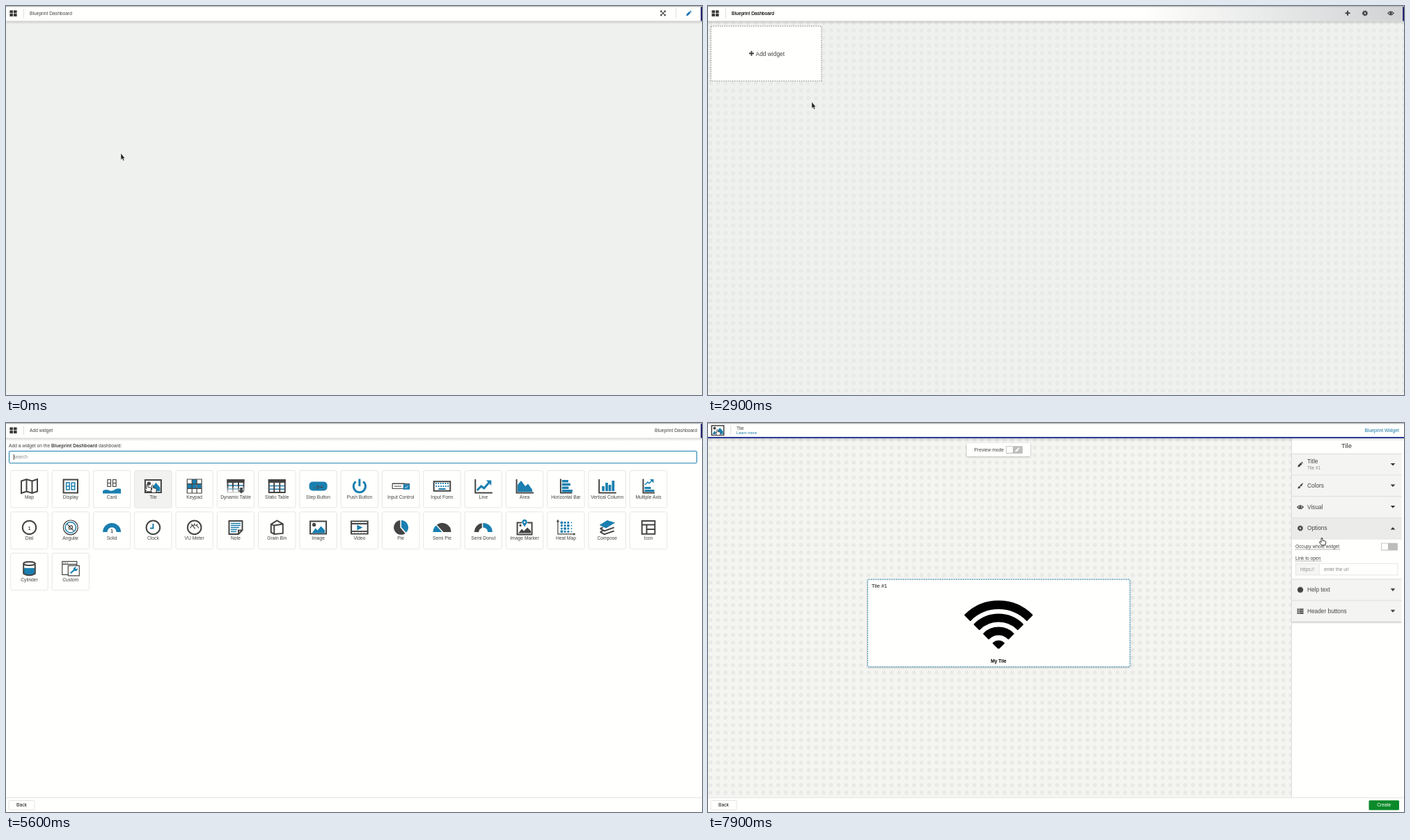
These frames come from a looping animation (1000 px wide and 560 px high, 8000 ms). An HTML page:

```html
<!DOCTYPE html>
<html lang="en">
<head>
<meta charset="utf-8">
<title>Dashboard builder</title>
<style>
html, body { margin: 0; width: 100%; height: 100%; overflow: hidden; background: #eff1ef; }
svg { display: block; width: 100vw; height: 100vh; }
text { font-family: "Liberation Sans", Arial, sans-serif; font-size: 6.7px; fill: #444; white-space: pre; }
.mid { text-anchor: middle; }
.end { text-anchor: end; }
.bold { font-weight: bold; }
.s, .n, .c { fill: none; stroke: #444; stroke-width: 2; }
.n { stroke-width: 1.2; }
.c { stroke: #1a7fb0; stroke-width: 1.5; }
.d { fill: #444; }
.b { fill: #1a7fb0; }
.w { fill: #fffffd; }
.i { fill: currentColor; }
.l { fill: none; stroke: currentColor; stroke-width: 1.2; }
.teeth { fill: none; stroke: currentColor; stroke-width: 1.4; stroke-dasharray: 1.5 1.17; }
.body { fill: none; stroke: currentColor; stroke-width: 1.9; }
.hand { fill: #fffffd; stroke: #222; stroke-width: .9; stroke-linejoin: round; }

.anim { animation: 8s step-end infinite both; }
.dash { animation-name: dash; }
.pick { animation-name: pick; }
.edit { animation-name: edit; }
.fade { animation-name: fade; animation-timing-function: linear; }
.add { animation-name: add; }
.over { animation-name: over; }
.leave { animation-name: leave; animation-timing-function: linear; }
.enter { animation-name: enter; animation-timing-function: linear; }
.status { animation-name: status; }
.caret { animation-name: caret; }
.tilehover { animation-name: tilehover; }
.card { animation: card 8s linear infinite both; animation-delay: calc(var(--i) * 20ms); }
.open { animation-name: open; }
.shut { animation-name: shut; }
.drop { animation-name: drop; }
.cursor { animation-name: cursor; }
.arrow { animation-name: arrow; }
.point { animation-name: point; }

@keyframes dash { 0% { opacity: 1 } 45%, 100% { opacity: 0 } }
@keyframes pick { 0% { opacity: 0 } 45% { opacity: 1 } 73.75%, 100% { opacity: 0 } }
@keyframes edit { 0% { opacity: 0 } 73.75%, 100% { opacity: 1 } }
@keyframes fade { 0%, 23.75% { opacity: 0 } 31.25%, 100% { opacity: 1 } }
@keyframes add { 0% { opacity: 0 } 23.75%, 100% { opacity: 1 } }
@keyframes over { 0% { opacity: 0 } 40%, 100% { opacity: 1 } }
@keyframes leave {
  0%, 23.75% { opacity: 1; transform: none }
  26.25% { opacity: .75; transform: translate(-9.4px, 0) }
  28.75%, 100% { opacity: 0; transform: translate(-20px, 0) }
}
@keyframes enter {
  0%, 28.75% { opacity: 0; transform: translate(10px, 0) }
  31.25%, 100% { opacity: 1; transform: none }
}
@keyframes status { 0% { opacity: 0 } 21.25% { opacity: 1 } 30% { opacity: 0 } 42.5%, 100% { opacity: 1 } }
@keyframes caret { 0% { opacity: 1 } 57.5% { opacity: 0 } 63.75%, 100% { opacity: 1 } }
@keyframes tilehover { 0% { opacity: 0 } 66.25%, 100% { opacity: 1 } }
@keyframes card { 0%, 46.75% { opacity: 0 } 50.25%, 100% { opacity: 1 } }
@keyframes open { 0% { opacity: 0 } 98.75%, 100% { opacity: 1 } }
@keyframes shut { 0% { opacity: 1 } 98.75%, 100% { opacity: 0 } }
@keyframes drop { 0% { transform: none } 98.75%, 100% { transform: translate(0, 57.7px) } }
@keyframes arrow {
  0% { opacity: 1 } 21.25% { opacity: 0 } 23.75% { opacity: 1 } 40% { opacity: 0 }
  45% { opacity: 1 } 66.25% { opacity: 0 } 73.75% { opacity: 1 } 92.5%, 100% { opacity: 0 }
}
@keyframes point {
  0% { opacity: 0 } 21.25% { opacity: 1 } 23.75% { opacity: 0 } 40% { opacity: 1 }
  45% { opacity: 0 } 66.25% { opacity: 1 } 73.75% { opacity: 0 } 92.5%, 100% { opacity: 1 }
}
@keyframes cursor {
  0% { transform: translate(165px, 212px) }
  7.5% { transform: translate(165px, 212px); animation-timing-function: steps(2, start) }
  10% { transform: translate(480px, 228px); animation-timing-function: steps(2, start) }
  12.5% { transform: translate(894px, 149px) }
  13.75% { transform: translate(894px, 149px); animation-timing-function: steps(5, start) }
  20% { transform: translate(987px, 20px) }
  21.25% { transform: translate(984px, 13px) }
  27.5% { transform: translate(984px, 13px); animation-timing-function: steps(4, start) }
  32.5% { transform: translate(675px, 238px); animation-timing-function: steps(4, start) }
  37.5% { transform: translate(149px, 138px) }
  38.75% { transform: translate(149px, 138px); animation-timing-function: steps(2, start) }
  41.25% { transform: translate(123px, 98px) }
  46.25% { transform: translate(123px, 98px); animation-timing-function: steps(5, start) }
  52.5% { transform: translate(174px, 330px) }
  63.75% { transform: translate(174px, 330px); animation-timing-function: steps(3, start) }
  67.5% { transform: translate(206px, 88px) }
  68.75% { transform: translate(206px, 88px); animation-timing-function: steps(2, start) }
  71.25% { transform: translate(203px, 88px) }
  73.75% { transform: translate(202px, 90px) }
  76.25% { transform: translate(202px, 90px); animation-timing-function: steps(4, start) }
  81.25% { transform: translate(251px, 214px) }
  83.75% { transform: translate(251px, 214px); animation-timing-function: steps(9, start) }
  95% { transform: translate(883px, 150px); animation-timing-function: steps(2, start) }
  97.5%, 100% { transform: translate(882px, 165px) }
}
</style>
</head>
<body>
<svg id="stage" viewBox="0 0 1000 560" preserveAspectRatio="none">
  <defs>
    <pattern id="dots" x="-1.9" y="19.1" width="10.83" height="10.8" patternUnits="userSpaceOnUse">
      <rect x="3.5" y="3.5" width="4" height="4" rx="1" fill="#e9ebe9" stroke="#e0e2e0" stroke-width=".9"/>
    </pattern>
    <linearGradient id="tint">
      <stop offset=".62" stop-color="#d0d2d4" stop-opacity="0"/>
      <stop offset="1" stop-color="#d0d2d4"/>
    </linearGradient>
    <linearGradient id="shade" x2="0" y2="1">
      <stop stop-color="#000" stop-opacity=".18"/>
      <stop offset="1" stop-color="#000" stop-opacity="0"/>
    </linearGradient>
    <linearGradient id="pale" x2="0" y2="1">
      <stop offset=".3" stop-color="#fffffd" stop-opacity="0"/>
      <stop offset="1" stop-color="#fffffd"/>
    </linearGradient>
    <filter id="soft" x="-10%" y="-20%" width="120%" height="150%">
      <feDropShadow dx="0" dy="1" stdDeviation="1.5" flood-opacity=".25"/>
    </filter>
  </defs>
</svg>
<script>
const WHITE = '#fffffd', BLUE = '#1a7fb0';

const rect = (x, y, w, h, fill, more = '') =>
  `<rect x="${x}" y="${y}" width="${w}" height="${h}" fill="${fill}" ${more}/>`;
const text = (x, y, str, cls = '', size = 6.7, fill = '#444') =>
  `<text x="${x}" y="${y}" class="${cls}" style="font-size:${size}px;fill:${fill}">${str}</text>`;
const group = (cls, ...parts) => `<g class="${cls}">${parts.join('')}</g>`;
const ring = (r, x = 0, y = 0) =>
  `M${x - r} ${y}a${r} ${r} 0 1 1 ${2 * r} 0a${r} ${r} 0 1 1 ${-2 * r} 0z`;
const box = (x, y, w, h) => `M${x} ${y}h${w}v${h}h${-w}z`;
const boxes = list => list.map(b => box(...b)).join('');

// "class:path;class:path", or raw markup
const draw = spec => spec.split(';').map(part => {
  if (part[0] === '<') return part;
  const [cls, d] = part.split(':');
  return `<path class="${cls}" d="${d}"/>`;
}).join('');
const icon = (x, y, spec, color = '#444', k = 1) =>
  `<g transform="translate(${x} ${y}) scale(${k})" color="${color}">${draw(spec)}</g>`;
const label = (x, y, str, size, color) =>
  `<text class="mid bold" x="${x}" y="${y}" style="font-size:${size}px;fill:${color}">${str}</text>`;

const glyph = {
  blocks: `i:${boxes([[-5, -4.3, 4.6, 3.9], [.6, -4.3, 4.6, 3.9], [-5, .4, 4.6, 3.9], [.6, .4, 4.6, 3.9]])}`,
  expand: 'l:M-3-3L3 3M3-3L-3 3;i:M-3.8-3.8h3L-3.8-.8zM3.8-3.8h-3L3.8-.8zM-3.8 3.8h3L-3.8.8zM3.8 3.8h-3L3.8.8z',
  pencil: 'i:M-3.7 3.7L-3.2 1.2 .7-2.7 2.7-.7-1.2 3.2zM1.2-3.2L2.2-4 4 -2.2 3.2-1.2z',
  plus: 'i:M-1-3.5h2v2.5h2.5v2H1v2.5h-2V1h-2.5v-2H-1z',
  gear: `teeth:${ring(3.4)};body:${ring(2.2)}`,
  eye: `l:M-4.2 0Q0-5 4.2 0Q0 5-4.2 0z;i:${ring(1.8)}`,
  brush: 'i:M4.3-4.3Q3 0 .6 1.5L-.9 0Q.8-2.6 4.3-4.3zM-1.5.5L.2 2.1Q-.5 4.8-4.2 3.8Q-3 3-2.8 1.6Q-2.4.5-1.5.5z',
  help: `i:${ring(4.2)};` + label(0, 2.4, '?', 7, WHITE),
  list: `i:${[-3.6, -.9, 1.8].map(y => box(-4.5, y, 2.3, 2.1) + box(-1.6, y, 6.2, 2.1)).join('')}`
};

const digits = (y, h) => [-6.2, 1.4].map(x => box(x, y, 4.6, h) + `M${x} ${y + h / 2}h4.6`).join('');
const axes = 's:M-11.5-10V9.5H13';
const hills = 'b:M-9 8L-4 1-1 4 4-2 9.5 4V8z';
const frame = `s:${box(-11.5, -9, 23, 18)}`;
const keys = [-4, 0, 4].map((y, r) => r === 2
  ? box(-5, y - .9, 10, 1.8)
  : Array.from({ length: 6 }, (_, i) => box(-9.5 + i * 3.4 + r * .4, y - .9, 1.8, 1.8)).join('')).join('');
const heat = Array.from({ length: 16 }, (_, i) =>
  ring(i % 4 === 3 ? .9 : i % 3 ? 1.6 : 2, -6 + i % 4 * 4.7, -7 + (i >> 2) * 4.3)).join('');
const table = `d:${box(-12.5, -10, 25, 5)};s:${box(-11.5, -9, 23, 18)}`;

const widgets = [
  ['Map', 's:M-11.5-7.5L-4-10 4-7.5 11.5-10V7.5L4 10-4 7.5-11.5 10zM-4-10V7.5M4-7.5V10'],
  ['Display', `s:${box(-10.2, -9.5, 20.4, 19)};c:${digits(-5, 10)}`],
  ['Card', `n:${digits(-9.5, 10)};b:M-13 6.5Q-8 4-4 6T4 5T13 4V10.5H-13z`],
  ['Tile', `${frame};d:${ring(2.6, -6, -4)};b:M-10 7L-6 1-3 4 4-5 10 2V7z;` +
    'hand:M-1.8-1Q-.8-2.6.2-1V2.4L4 3.3Q5 3.7 4.8 5L4 9.5H-.8L-4.6 5Q-4.4 3.6-3 4L-1.8 5z'],
  ['Keypad', `b:${boxes([[-3.5, -10, 7, 6], [-10, -3, 7, 6], [-3, -3, 6, 6], [4, -3, 6, 6]])};n:${box(-10.4, -10, 20.8, 20)}M-3.4-10V10M3.4-10V10M-10.4-3.4H10.4M-10.4 3.4H10.4`],
  ['Dynamic Table', `${table};c:M-11-1H11M-11 4H11;s:M-4-6V9M4-6V9;<rect x="-13" y="-5" width="26" height="16" fill="url(#pale)"/>;d:M6.3 2h3.4v4h2.6L8 10.5 3.7 6h2.6z`],
  ['Static Table', `${table};c:M-11-.6H11M-11 4.2H11;s:M-4-6V9M4-6V9`],
  ['Step Button', '<rect class="b" x="-13" y="-6.5" width="26" height="13" rx="5"/>;' + label(0, 3.6, '- 5º+', 10, WHITE)],
  ['Push Button', '<path class="c" style="stroke-width:3" d="M-5.3-6.6A8.6 8.6 0 1 0 5.3-6.6M0-10.5V0"/>'],
  ['Input Control', `n:${box(-12, -3.5, 24, 7)}M-9.5 0H1M-12.5-3.8H6;b:${box(3.5, -2.8, 9.5, 7.6)};<path d="M6 1L7.6 2.6 10.6-.6" fill="none" stroke="${WHITE}"/>`],
  ['Input Form', `s:${box(-11.8, -6.8, 23.6, 13.6)};b:${keys}`],
  ['Line', `${axes};<path class="c" style="stroke-width:3" d="M-9 6L-3 0 1 3 8-5"/>;b:M4-8.5H11.5V-1z`],
  ['Area', `${axes};b:M-10 8V-2L-5-8 1 0 5-3.5 11 5V8z`],
  ['Horizontal Bar', `s:M-7.5-10.5V9.5H9;b:${boxes([[-5.5, -9, 9, 3.5], [-5.5, -4.3, 12, 3.5], [-5.5, .4, 9.5, 3.5], [-5.5, 5, 15, 3.5]])}`],
  ['Vertical Column', `${axes};b:${boxes([[-7.5, 0, 3.7, 7], [-2.5, -5, 3.7, 12], [2, -2, 3.7, 9], [6.8, -8, 3.7, 15]])}`],
  ['Multiple Axis', `s:M-7.5-10.5V9.5H9;b:${boxes([[-5.5, 1, 9, 3], [-5.5, 5, 14, 3]])}M2-10H7.5V-4.5z;c:M-5-2L-1-6 1-4 5-8`],
  ['Dial', `s:${ring(9.7)};` + label(0, 3.8, '1', 10.5, BLUE)],
  ['Angular', `n:${ring(10.4)};c:${ring(7.6)};n:M-5-5L4.5 5M-2 2.5Q-4-3 2-2.5Q5 3-2 2.5z`],
  ['Solid', 'b:M-13 6.5A13 13 0 0 1 13 6.5H6.6A6.6 6.6 0 0 0-6.6 6.5z;' + label(0, 7.2, '1', 8, '#444')],
  ['Clock', `s:${ring(9.8)};<path class="c" style="stroke-width:2" d="M0-5.5V1H-4.5"/>`],
  ['VU Meter', `s:${ring(9.8)};n:M-6 1A6.3 6.3 0 0 1 6 1M-3-3.5L1 2M-4.5-5L-3-3M4.5-5L3-3M0-6V-4`],
  ['Note', 's:M-9.5-9.5H9.5V4L4 9.5H-9.5zM9.5 4H4V9.5;c:M-7-6H7M-7-3H7M-7 0H5M-7 3H2M-7 6H1'],
  ['Grain Bin', 's:M-8.5-4.5L0-10 8.5-5V8.5L-4 9.5-8.5 7zM-8.5-4.5L-4-3V9.5M-4-3L8.5-5'],
  ['Image', `${frame};d:${ring(2.6, -6, -4)};${hills}`],
  ['Video', `s:${box(-11.8, -9, 23.6, 18)}M-11-5.5H11M-11 5.5H11;w:${[-9, -4.5, 0, 4.5, 9].map(x => box(x - 1, -8, 2, 1.6) + box(x - 1, 6.4, 2, 1.6)).join('')};b:M-3.5-4V4L4.5 0z`],
  ['Pie', 'd:M-.8-10.5A10.5 10.5 0 1 0 6.5 8.5L-.8 0z;b:M.8-10.5A10.5 10.5 0 0 1 7.8 7.3L.8-.5z'],
  ['Semi Pie', 'b:M-13 6.5A13 13 0 0 1-8.5-3L0 6.5z;d:M-7.6-4A13 13 0 0 1 13 6.5H2z'],
  ['Semi Donut', 'd:M-13 6.5A13 13 0 0 1-2-6.3V.5A6.5 6.5 0 0 0-6.5 6.5z;b:M-.5-6.5A13 13 0 0 1 13 6.5H6.5A6.5 6.5 0 0 0-.5.2z'],
  ['Image Marker', `s:M-4-7H-10.5V10H10.5V-7H4;d:M-9 8L-4 2-1 5 4 0 9 5V8z${ring(1.7, -6, -3)};b:M0-1L-3.6-7A3.7 3.7 0 1 1 3.6-7z;w:${ring(1.3, 0, -7.6)}`],
  ['Heat Map', `n:M-11.5-10V9.5H13M-13-8L-11.5-10.5-10-8M11-11;d:M11 7.5L14 9.5 11 11.5z;b:${heat}`],
  ['Compose', 's:M-10 6.5L-4 9.8 10 5M-10 1.5L-4 5 10 0M-10 6.5L-6 4.5M-10 1.5L-6 0;b:M-11-3.5L0-10.5 11.5-7-1.5 1z'],
  ['Icon', `s:${box(-9.3, -9.3, 18.6, 18.6)}M-9-4H9M-2.5-4V9M-2.5 2.5H9`],
  ['Cylinder', 'b:M-7.5-1H7.5V7.5Q0 11-7.5 7.5z;s:M-8.3-7.5V7Q0 12 8.3 7V-7.5A8.3 2.6 0 1 0-8.3-7.5A8.3 2.6 0 0 0 8.3-7.5'],
  ['Custom', `n:${box(-12, -10.5, 21, 19)}M-12-6.5H9M-10-8.5h1M-7.5-8.5h1M-5-8.5h1;w:${box(-3.5, -4.5, 16, 15)};n:${box(-3.5, -4.5, 16, 14.5)};<path class="c" style="stroke-width:2.2" d="M0 6.5L6 1"/>;b:M4 1Q4-3 8.5-2.5L6.8-.5 8 .8 10-1Q10.5 4 6 3.3z`]
];

const header = (...parts) =>
  rect(0, 21, 1000, 5, 'url(#shade)') + rect(0, 0, 1000, 21.5, WHITE) +
  parts.join('') + rect(0, 0, 1000, 1.3, '#b9bab8');
const rule = (x, y = 3.5, h = 14) => rect(x, y, .8, h, '#d8d9d7');
const menu = title => icon(10.4, 10.6, glyph.blocks, '#3a3a3a') + rule(25) + text(34, 13.2, title);
const edge = rect(998.2, 0, 1.8, 21.5, '#17176b');
const footer = rect(0, 539.5, 1000, 20.5, WHITE) + rect(0, 539, 1000, .8, '#dfe0de') +
  rect(4, 543.5, 37, 13.5, WHITE, 'rx="1.5" stroke="#dcdddb" stroke-width=".8"') +
  text(22.5, 552.3, 'Back', 'mid', 6.7, '#111');

const dashboard = group('anim dash',
  rect(0, 0, 1000, 560, '#eff1ef'),
  group('anim fade', rect(0, 22, 1000, 538, 'url(#dots)')),
  header(
    group('anim fade', rect(0, 0, 1000, 21.5, 'url(#tint)')),
    menu('Blueprint Dashboard'),
    group('anim add', text(34, 13.2, 'Blueprint Dashboard', '', 6.7, '#222')),
    group('anim leave', icon(944, 10.4, glyph.expand), rule(962.3), icon(981, 10.6, glyph.pencil, '#1a73b5')),
    group('anim enter', icon(919, 10.3, glyph.plus), icon(944, 10.4, glyph.gear), rule(962.3), icon(981, 10.4, glyph.eye)),
    edge),
  group('anim add',
    rect(4.2, 29, 159, 79, WHITE),
    group('anim over', rect(4.2, 29, 159, 79, '#e3e5e3')),
    rect(4.2, 29, 159, 79, 'none', 'stroke="#a9aaa9" stroke-width="1.6" stroke-dasharray="1.6 1.6"'),
    icon(62.5, 68.2, glyph.plus),
    text(68.6, 71.6, 'Add widget', '', 8.4)),
  group('anim status', `<path d="M0 547H231Q233 547 233 549V560H0z" fill="#dadddf" stroke="#cfd2d3" stroke-width=".6"/>`));

const cards = widgets.map(([name, spec], i) => {
  const x = 33.5 + i % 16 * 59.3, y = 95.2 + Math.floor(i / 16) * 59.4;
  const hover = name === 'Tile' ? group('anim tilehover', rect(x - 26.7, y - 26.7, 53.4, 53.4, '#f2f3f1', 'rx="2"')) : '';
  return `<g class="card" style="--i:${i}">` + hover +
    rect(x - 26.7, y - 26.7, 53.4, 53.4, 'none', 'rx="2" stroke="#e4e5e3" stroke-width=".9"') +
    icon(x, y - 4.2, spec) + text(x, y + 13.8, name, 'mid') + '</g>';
}).join('');

const picker = group('anim pick',
  rect(0, 0, 1000, 560, WHITE),
  header(menu('Add widget'), text(993, 13.2, 'Blueprint Dashboard', 'end'), edge),
  text(4, 35.4, 'Add a widget on the <tspan class="bold">Blueprint Dashboard</tspan> dashboard:'),
  rect(4.5, 40.5, 988, 17.3, WHITE, `rx="1.5" stroke="${BLUE}"`),
  text(11, 51.2, 'search', '', 6.7, '#8a8a8a'),
  group('anim caret', rect(10.8, 45, .8, 8, '#222')),
  cards, footer);

// ring slice spanning 45 degrees to each side of straight up
const slice = (r0, r1) => {
  const a = r0 * Math.SQRT1_2, b = r1 * Math.SQRT1_2;
  return `M${-b} ${-b}A${r1} ${r1} 0 0 1 ${b} ${-b}L${a} ${-a}A${r0} ${r0} 0 0 0 ${-a} ${-a}z`;
};
const wifi = `<path transform="translate(417.5 324.6)" stroke="#000" stroke-width="2" stroke-linejoin="round" d="${
  [[1, 10.7], [20, 30], [39, 49], [57.5, 68]].map(r => slice(...r)).join('')}"/>`;

const toggle = (x, y) => rect(x, y, 24, 10.6, '#bdbebc', 'rx="1"') + rect(x + .8, y + .8, 9.2, 9, WHITE, 'rx=".8"');
const chevron = (y, up) => `<path d="M980.6 ${up ? y + 1.8 : y - 1.8}h6.8l-3.4 ${up ? -3.6 : 3.6}z" fill="#333"/>`;
const row = (y, name, mark, sub = '') =>
  rect(839, y, 157.5, 30.6, '#f4f5f3') + rect(839, y, 157.5, .8, '#d6d7d5') + icon(851, y + 15.7, glyph[mark]) +
  text(861, y + (sub ? 13.8 : 18.6), name, '', 8.3) + (sub && text(861, y + 23, sub, '', 6.5, '#8a8a8a'));
const dotted = (x, y, w) => `<path d="M${x} ${y}h${w}" stroke="#555" stroke-width=".8" stroke-dasharray="1 .8"/>`;

const options = group('anim open',
  rect(839, 136.8, 157.5, 30, '#ebecea'), icon(851, 151.5, glyph.gear), text(861, 154.4, 'Options', '', 8.3),
  chevron(151.8, true), rect(839, 166.6, 157.5, 58, WHITE), rect(839, 166.6, 157.5, .8, '#d6d7d5'),
  text(844, 180.4, 'Occupy whole widget'), dotted(844, 182, 64), toggle(967, 172.8),
  text(844, 197, 'Link to open'), dotted(844, 198.7, 37),
  rect(844.5, 202.3, 146.5, 16.6, WHITE), rect(844.5, 202.3, 33.5, 16.6, '#f5f6f4'),
  rect(844.5, 202.3, 146.5, 16.6, 'none', 'stroke="#dfe0de" stroke-width=".8"'), rect(877.8, 202.3, .8, 16.6, '#dfe0de'),
  text(851, 212.9, 'https://', '', 6.7, '#8f8f8f'), text(885, 212.9, 'enter the url', '', 6.7, '#858585'));

const panel = rect(838, 22, 162, 517.5, WHITE) + rect(838, 22, .9, 517.5, '#d9dad8') +
  text(917.5, 36, 'Tile', 'mid', 9.5, '#333') +
  row(44, 'Title', 'pencil', 'Tile #1') + chevron(59.8) + row(74.6, 'Colors', 'brush') + chevron(90.3) +
  row(105.3, 'Visual', 'eye') + chevron(120.8) + row(136, 'Options', 'gear') +
  group('anim shut', chevron(151.5)) + options +
  group('anim drop', row(166.7, 'Help text', 'help'), chevron(182.4), row(197.4, 'Header buttons', 'list'), chevron(213),
    rect(839, 228, 157.5, .8, '#cdcecc'), rect(839, 228.8, 157.5, 2.5, 'url(#shade)'));

const editor = group('anim edit',
  rect(0, 0, 1000, 560, '#f4f4f1'), rect(0, 22, 838, 517.5, 'url(#dots)'),
  rect(372, 29, 91, 19, WHITE, 'filter="url(#soft)"'), text(382.5, 41, 'Preview mode'),
  toggle(428, 33.3), icon(444.5, 38.6, glyph.pencil, WHITE, .85),
  rect(229.4, 225.2, 376.8, 125.8, WHITE, 'filter="url(#soft)"'),
  rect(229.4, 225.2, 376.8, 125.8, 'none', `rx="1" stroke="${BLUE}" stroke-width=".9" stroke-dasharray="2.2 1.1"`),
  text(235, 237, 'Tile #1', '', 7.5, '#111'), wifi, text(417.5, 345.4, 'My Tile', 'mid bold', 6.7, '#000'),
  panel,
  header(icon(14, 10.6, widgets[3][1], '#444', .76), rule(32.3),
    text(41, 10.2, 'Tile'), text(41, 16.4, 'Learn more', '', 5.7, '#1676a8'),
    text(993, 13.2, 'Blueprint Widget', 'end', 6.75, '#1676a8'), rect(0, 20, 1000, 2, '#2b3a97')),
  footer, rect(949.5, 543.2, 43.5, 14, '#0b8a2a', 'rx="1.5"'), text(971.2, 552.4, 'Create', 'mid', 6.7, WHITE));

const cursor = group('anim cursor',
  group('anim arrow', '<path d="M0 0V9.5L2 7.6 3.4 11 5 10.3 3.6 7.2H6z" fill="#222" stroke="#fffffd" stroke-width=".5"/>'),
  group('anim point', '<path class="hand" d="M-1 1Q0-.8 1 1V4.2L5 5Q6 5.5 5.8 6.8L5 10.8H-.5L-3.6 6.8Q-3.5 5.4-2.2 5.8L-1 6.8z"/>'));

document.getElementById('stage').insertAdjacentHTML('beforeend', dashboard + picker + editor + cursor);
</script>
</body>
</html>
```
